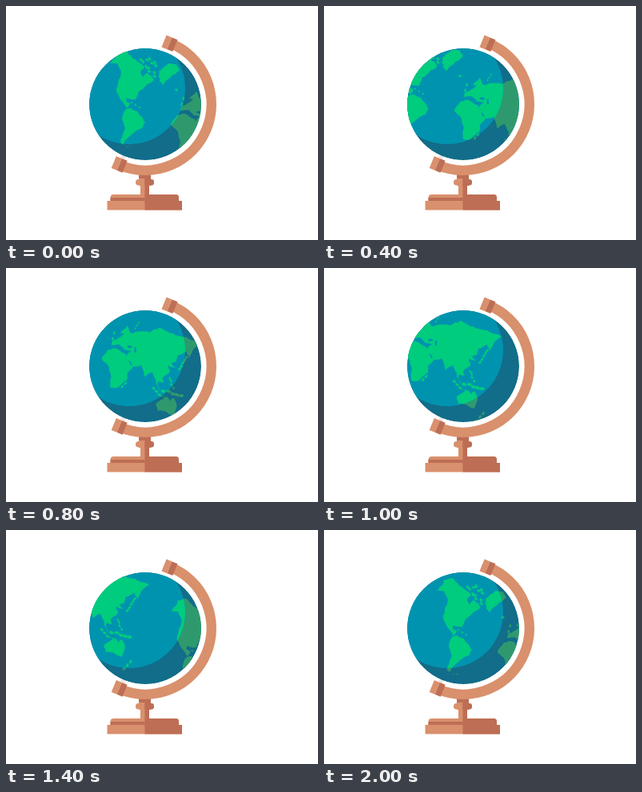
Recreate the animation shown at these times as an HTML page with a canvas. Size 390 by 293 pixels, loop 2.1 s.

```html
<!DOCTYPE html>
<html lang="en">
<head>
<meta charset="utf-8">
<title>Spinning globe</title>
<style>
html, body { margin: 0; width: 100%; height: 100%; overflow: hidden; background: #fff; }
canvas { display: block; }
</style>
</head>
<body>
<canvas id="stage"></canvas>
<script>
const W = 390, H = 293, STEPS = 21, STEP_MS = 100;
const DX = 10.8, DY = 4.3;            // map shift per step
const CX = 174, CY = 123, R = 70, TILT = 22.5 * Math.PI / 180;
const LIGHT = '#d9906c', DARK = '#bd6e54';
const SEA = '#0093af', SEA_SHADE = '#116d89', LAND = '#00cc7e', LAND_SHADE = '#2f996e';

const canvas = document.getElementById('stage');
const dpr = window.devicePixelRatio || 1;
canvas.width = W * dpr;
canvas.height = H * dpr;
canvas.style.width = W + 'px';
canvas.style.height = H + 'px';
const c = canvas.getContext('2d');

let seed = 7;
function jitter(size) {
  seed = seed * 16807 % 2147483647;
  return (seed / 2147483647 * 2 - 1) * size;
}

const land = new Path2D(), lakes = new Path2D();

// Joins key points, placed as seen at the given step, with a ragged coast.
function coast(step, keys) {
  const pts = keys.split(', ').map(p => p.split(' ').map(Number));
  pts.forEach(([x, y], i) => {
    const [nx, ny] = pts[(i + 1) % pts.length];
    const len = Math.hypot(nx - x, ny - y), parts = Math.ceil(len / 4);
    for (let j = 0; j < parts; j++) {
      const f = j / parts, bump = j ? jitter(0.9) / len : 0;
      const px = x + (nx - x) * f + (ny - y) * bump + step * DX;
      const py = y + (ny - y) * f - (nx - x) * bump + step * DY;
      if (i || j) land.lineTo(px, py); else land.moveTo(px, py);
    }
  });
  land.closePath();
}

// A chain of small islands between two points.
function isles(step, x1, y1, x2, y2, count, size, spread = 0) {
  for (let i = 0; i < count; i++) {
    const f = count > 1 ? i / (count - 1) : 0;
    const x = x1 + (x2 - x1) * f + jitter(spread) + step * DX;
    const y = y1 + (y2 - y1) * f + jitter(spread) + step * DY;
    const turn = Math.atan2(y2 - y1, x2 - x1) + jitter(0.4), long = size * 1.6;
    land.moveTo(x + long * Math.cos(turn), y + long * Math.sin(turn));
    land.ellipse(x, y, long, size, turn, 0, 2 * Math.PI);
  }
}

function lake(step, x, y, rx, ry) {
  const px = x + step * DX, py = y + step * DY;
  lakes.moveTo(px + rx, py);
  lakes.ellipse(px, py, rx, ry, 0, 0, 2 * Math.PI);
}

// North America, South America, Greenland
coast(0, '129 72, 137 65, 139 58, 150 56, 158 65, 173 76, 168 83, 171 89, 177 83, 185 92, 166 107, 162 117, 151 115, 150 119, 155 122, 151 128, 143 117, 138 107, 144 82, 139 72');
coast(0, '149 130, 156 128, 164 132, 174 146, 170 153, 163 156, 149 168, 146 174, 143 171, 149 153, 145 141');
coast(0, '191 82, 203 72, 213 73, 217 80, 202 92, 196 99, 192 94');
isles(0, 168, 69, 187, 86, 8, 1.5, 2.5);
isles(0, 177, 66, 187, 74, 5, 1.5, 2);
isles(0, 157, 121, 167, 127, 3, 0.9);
isles(0, 151, 176, 155, 176, 2, 0.6);
isles(0, 213, 105, 214, 105, 1, 1.3);

// Africa
coast(6, '141 123, 149 111, 158 109, 171 116, 177 130, 182 130, 173 141, 173 148, 162 158, 152 158, 153 145, 149 130');
isles(6, 171, 153, 167, 157, 2, 1.4);
isles(6, 157, 90, 155, 97, 2, 1.3);

// Eurasia, Australia
coast(10, '110 88, 112 82, 119 79, 126 74, 121 73, 130 64, 134 73, 144 71, 158 72, 170 66, 183 73, 204 78, 222 86, 212 94, 208 104, 204 96, 193 101, 191 109, 185 111, 190 116, 181 113, 183 122, 174 129, 176 135, 168 134, 171 146, 161 122, 152 128, 147 113, 138 115, 129 101, 135 95, 127 94, 120 87');
coast(10, '166 161, 179 153, 184 158, 188 154, 192 165, 188 176, 178 171, 168 170');
isles(10, 204, 103, 195, 118, 5, 1.4, 0.6);
isles(10, 183, 129, 187, 141, 4, 1.2, 1);
isles(10, 163, 142, 170, 150, 3, 1.5);
isles(10, 173, 152, 180, 154, 3, 0.8);
isles(10, 176, 145, 197, 151, 5, 1.9, 1);
isles(10, 199, 182, 191, 191, 3, 1.5);
isles(10, 140, 67, 144, 60, 3, 0.9);
lake(10, 133, 90, 3, 1.6);
lake(10, 140, 94, 1.3, 3.5);

const globe = new Path2D(), lit = new Path2D();
globe.arc(CX, CY, R, 0, 2 * Math.PI);
lit.arc(CX - 20, CY - 20, R, 0, 2 * Math.PI);

function drawMap(sea, ground, step) {
  c.fillStyle = sea;
  c.fill(globe);
  for (const lap of [-STEPS, 0, STEPS]) {
    c.save();
    c.translate((lap - step) * DX, (lap - step) * DY);
    c.fillStyle = ground;
    c.fill(land);
    c.fillStyle = sea;
    c.fill(lakes);
    c.restore();
  }
}

function drawGlobe(step) {
  c.save();
  c.clip(globe);
  drawMap(SEA_SHADE, LAND_SHADE, step);
  c.clip(lit);
  drawMap(SEA, LAND, step);
  c.restore();
}

function box(color, x, y, w, h, r = 0) {
  c.fillStyle = color;
  c.beginPath();
  c.roundRect(x, y, w, h, r);
  c.fill();
}

function drawArm() {
  c.save();
  c.translate(CX, CY);
  c.rotate(TILT);
  box('#ece7e4', -3, 69, 6, 6);
  c.strokeStyle = LIGHT;
  c.lineWidth = 12.6;
  c.beginPath();
  c.arc(0, 0, 82.7, -Math.PI / 2, Math.PI / 2);
  c.stroke();
  for (const y of [-90, 74]) {
    box(LIGHT, -8.5, y, 7.5, 16);
    box(DARK, -1, y, 7.5, 16);
  }
  c.restore();
}

function footShape(color) {
  box(color, 166, 211, 15, 14);
  box(color, 162, 217, 23, 7.5, 3.5);
  box(color, 168, 224, 11, 13);
  box(color, 130.5, 236, 85.5, 9, [4, 4, 0, 0]);
  box(color, 126.5, 244, 93.5, 11.5);
}

function drawFoot() {
  footShape(LIGHT);
  box(DARK, 166, 211, 8, 5);
  box(DARK, 130.5, 240, 43, 4);
  c.save();
  c.beginPath();
  c.rect(173.5, 0, W, H);
  c.clip();
  footShape(DARK);
  c.restore();
}

function frame() {
  const step = Math.floor(performance.now() / STEP_MS) % STEPS;
  c.setTransform(dpr, 0, 0, dpr, 0, 0);
  c.fillStyle = '#fff';
  c.fillRect(0, 0, W, H);
  drawFoot();
  drawArm();
  drawGlobe(step);
  requestAnimationFrame(frame);
}
frame();
</script>
</body>
</html>
```
